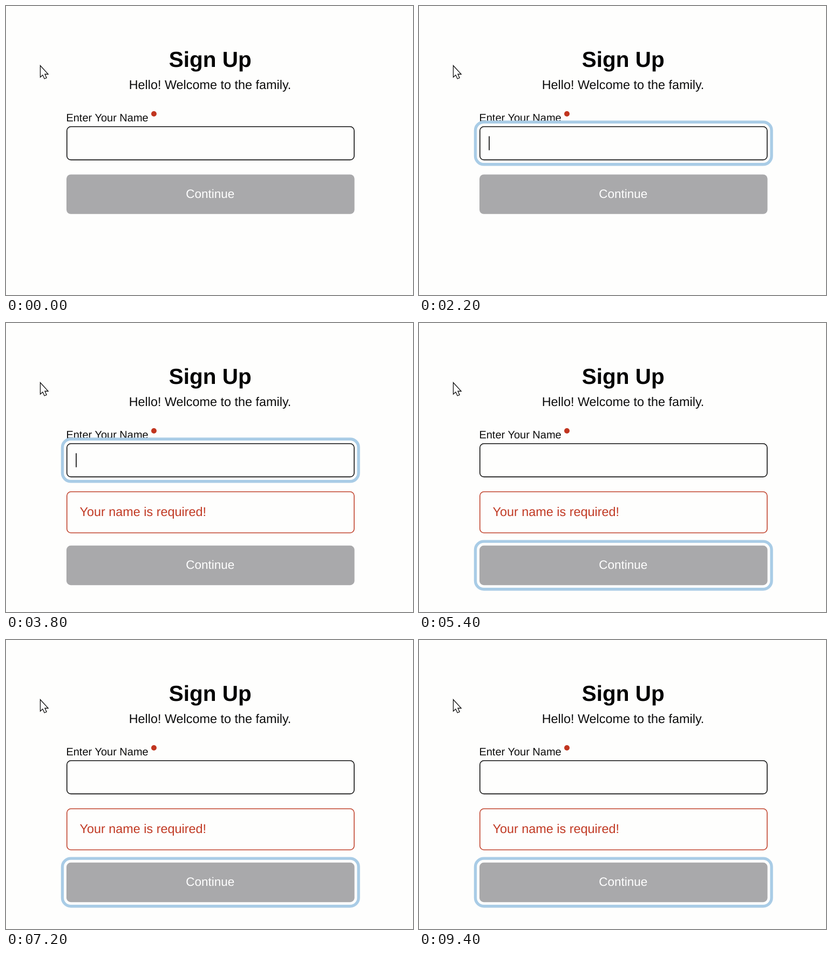
Animation of 754x536 px, one loop 10000 ms. Source, as an HTML page:

```html
<!DOCTYPE html>
<html lang="en">
<head>
<meta charset="utf-8">
<title>Sign Up</title>
<style>
  html, body { margin: 0; width: 100%; height: 100%; overflow: hidden; background: #fefefd; }
  svg { display: block; width: 754px; height: 536px; }
  text { font-family: "Liberation Sans", Arial, sans-serif; text-rendering: geometricPrecision; fill: #0c0c0c; }
  .mid { text-anchor: middle; }
  .ring { fill: #fefefd; stroke: #a9cce6; stroke-width: 5.4; }
  .box { fill: #fefefd; stroke-width: 1.6; }
</style>
</head>
<body>
<svg viewBox="0 0 754 536">
  <text class="mid" x="378.3" y="113" font-size="40.5" font-weight="bold" style="fill:#000">Sign Up</text>
  <text class="mid" x="378" y="154" font-size="23.4">Hello! Welcome to the family.</text>
  <text x="111.4" y="214" font-size="20">Enter Your Name</text>

  <rect id="inputRing" class="ring" x="104.5" y="215.2" width="548.6" height="78.6" rx="15.5"/>
  <circle cx="274" cy="200" r="5" fill="#c1351f"/>
  <rect class="box" x="112.8" y="223.8" width="532.2" height="61.6" rx="7.5" stroke="#111"/>
  <rect id="caret" x="129.2" y="241.5" width="1.7" height="26" fill="#111"/>

  <g id="error">
    <rect class="box" x="112.8" y="313" width="532.2" height="76.2" rx="7.5" stroke="#c1452f"/>
    <text x="136.6" y="358" font-size="23.4" style="fill:#c13a24">Your name is required!</text>
  </g>

  <g id="button">
    <rect id="buttonRing" class="ring" x="104.5" y="304.7" width="548.6" height="88.6" rx="15.5"/>
    <rect x="112" y="312.4" width="533.6" height="73.4" rx="8" fill="#a9a9ab"/>
    <text class="mid" x="378.3" y="355.7" font-size="22.5" style="fill:#fff">Continue</text>
  </g>

  <path d="M63.5 110.5V132L68 128L71.2 135L75.2 133.2L72 126.5H78.2Z" fill="#fff" stroke="#111" stroke-width="1.3"/>
</svg>
<script>
  const LOOP = 10000, SUBMIT = 2400;
  // [start, end] spans in ms
  const inputFocus = [[1000, 2400], [3800, 5000], [5800, 6800], [7600, 9000]];
  const caretOn = [[1000, 1600], [2200, 2400], [3800, 4200], [4800, 5000],
                   [5800, 6400], [7600, 8200], [8800, 9000]];

  const el = id => document.getElementById(id);
  const within = (t, spans) => spans.some(([a, b]) => t >= a && t < b);
  const show = (id, on) => el(id).setAttribute("visibility", on ? "visible" : "hidden");

  function draw(now) {
    const t = now % LOOP;
    const failed = t >= SUBMIT;
    const typing = within(t, inputFocus);
    show("inputRing", typing);
    show("caret", within(t, caretOn));
    show("error", failed);
    show("buttonRing", failed && !typing);
    el("button").setAttribute("transform", `translate(0 ${failed ? 100.4 : 0})`);
  }

  let start;
  function tick(now) {
    start ??= now;
    draw(now - start);
    requestAnimationFrame(tick);
  }
  draw(0);
  requestAnimationFrame(tick);
</script>
</body>
</html>
```
